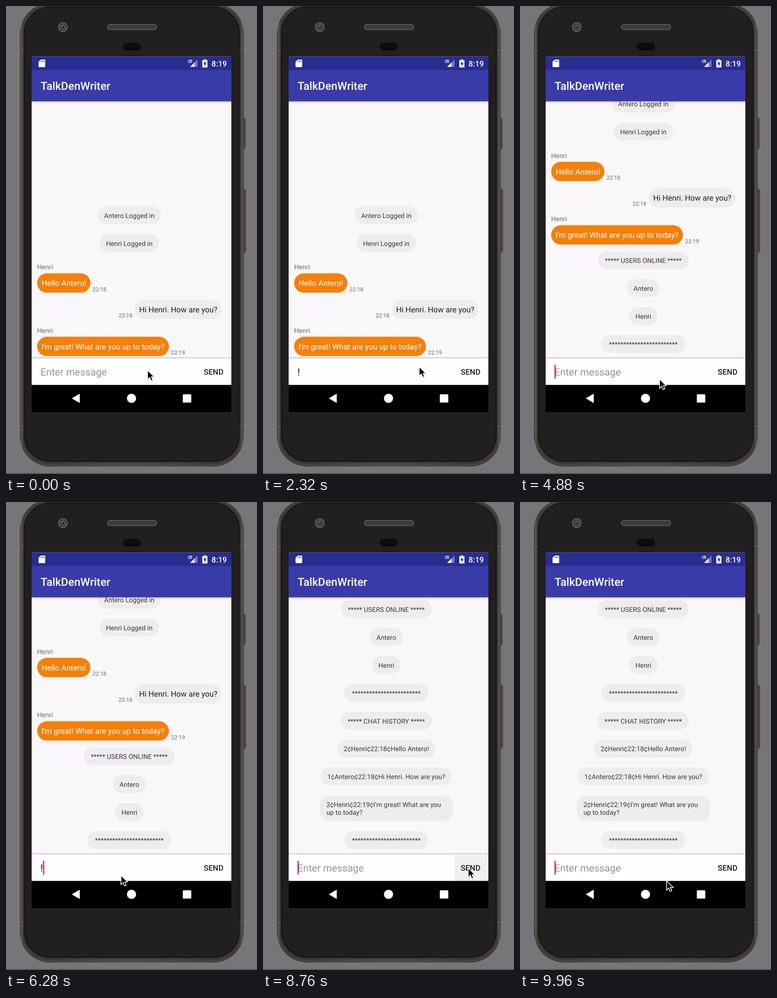
An HTML page that plays this animation: 548x1022 px, repeating every 10000 ms.

```html
<!DOCTYPE html>
<html lang="en">
<head>
<meta charset="utf-8">
<title>Chat client</title>
<style>
  html, body { margin: 0; width: 100%; height: 100%; overflow: hidden; background: #777577; }
  svg { display: block; width: 100vw; height: 100vh; }
  text { font-family: Roboto, sans-serif; white-space: pre; text-rendering: geometricPrecision; }
  .medium { font-weight: 500; }
  .field { font-size: 21.8px; }
</style>
</head>
<body>
<svg viewBox="0 0 548 1022">
  <defs>
    <clipPath id="listClip"><rect x="56" y="208" width="436" height="560"/></clipPath>
    <clipPath id="fieldClip"><rect x="56" y="770" width="436" height="57.5"/></clipPath>
    <linearGradient id="rim">
      <stop offset="0" stop-color="#353230"/>
      <stop offset=".007" stop-color="#5b5754"/>
      <stop offset=".014" stop-color="#3a3735"/>
      <stop offset=".5" stop-color="#4a4643"/>
      <stop offset=".986" stop-color="#3a3735"/>
      <stop offset=".993" stop-color="#5b5754"/>
      <stop offset="1" stop-color="#353230"/>
    </linearGradient>
    <linearGradient id="drop" x2="0" y2="1">
      <stop offset="0" stop-color="#000" stop-opacity=".25"/>
      <stop offset="1" stop-color="#000" stop-opacity="0"/>
    </linearGradient>
  </defs>

  <!-- Phone -->
  <rect width="548" height="1022" fill="#777577"/>
  <rect y="1020" width="548" height="2" fill="#555355"/>
  <g fill="#4a4745" stroke="#353230" stroke-width=".8">
    <rect x="517" y="245" width="5.5" height="67" rx="2"/>
    <rect x="517" y="400" width="6.5" height="138" rx="2"/>
  </g>
  <rect x="30.5" y="-6" width="488.5" height="1011.5" rx="66" fill="url(#rim)"/>
  <rect x="33.5" y="-3" width="482.5" height="1005.5" rx="63" fill="none" stroke="#5b5754"/>
  <rect x="39" y="1" width="471.5" height="995" rx="58" fill="#191718"/>
  <rect x="42" y="4" width="465.5" height="989" rx="55" fill="#221f20"/>
  <path d="M31 97h8M510 97h8M31 918h8M510 918h8" stroke="#6c6865" stroke-width="1.5"/>

  <circle cx="124" cy="46" r="10.5" fill="#6a6768"/>
  <circle cx="124" cy="46" r="8.5" fill="#343134"/>
  <circle cx="124" cy="46" r="6" fill="#5d5a5e"/>
  <circle cx="124" cy="46" r="3.5" fill="#29262a"/>
  <circle cx="123" cy="44.5" r="1.2" fill="#8e8a90"/>
  <rect x="221.5" y="40.5" width="107.5" height="11" rx="5" fill="#3c393a" stroke="#6a6664" stroke-width="1.3"/>
  <rect x="255" y="80" width="39.5" height="17" rx="8.5" fill="#0d0b0c"/>

  <!-- Screen -->
  <rect x="56" y="110.5" width="436" height="776.5" fill="#f9f7fa"/>
  <g id="list" clip-path="url(#listClip)"><g id="items"></g></g>
  <rect x="56" y="207.5" width="436" height="5" fill="url(#drop)"/>
  <rect x="56" y="139" width="436" height="69" fill="#393ba9"/>
  <rect x="56" y="110.5" width="436" height="29" fill="#292c90"/>
  <text class="medium" x="75.5" y="182.8" font-size="24.2" fill="#fff">TalkDenWriter</text>

  <!-- Status icons -->
  <path d="M76 117h8q1.5 0 1.5 1.5v13.500q0 1.500-1.500 1.500h-11.500q-1.500 0-1.500-1.500v-10z" fill="#fff"/>
  <path d="M76.800 119v3.500M79.700 119v3.500M82.600 119v3.500" stroke="#292c90" stroke-width="1.300"/>
  <text class="medium" x="397" y="124" font-size="9" letter-spacing="-1.2" fill="#fff" style="font-family:'Roboto Condensed',Roboto,sans-serif">LTE</text>
  <path d="M418 117v16h-16z" fill="#fff" opacity=".38"/>
  <path d="M411.500 123.500v9.500h-9.500z" fill="#fff"/>
  <path d="M432 116.500h4.500v1.700h3.300v16h-11.200v-16h3.400z" fill="#fff"/>
  <path d="M435.300 119.800l-4.300 7.200h2.600v5l4.300-7.200h-2.600z" fill="#292c90"/>
  <text class="medium" x="448.800" y="131.500" font-size="16.950" fill="#fff">8:19</text>

  <!-- Message field -->
  <rect x="56" y="767" width="436" height="3" fill="#d3d1d4"/>
  <rect x="56" y="769.500" width="436" height="58.500" fill="#fefefe"/>
  <rect id="ripple" x="418" y="771" width="74" height="56" fill="#000"/>
  <g clip-path="url(#fieldClip)">
    <text id="hint" class="field" x="75.300" y="807" fill="#979598">Enter message</text>
    <text id="typed" class="field" x="75.300" y="807" fill="#1c1b1d"></text>
    <rect id="caret" width="2.400" height="30" fill="#cb1463"/>
  </g>
  <text class="medium" x="431.800" y="805" font-size="16.950" fill="#1c1b1d">SEND</text>

  <!-- Navigation -->
  <rect x="56" y="827.500" width="436" height="59.500" fill="#000"/>
  <g fill="#fff">
    <path d="M144.500 856.800L160.500 847.300V866.300Z" stroke="#fff" stroke-linejoin="round"/>
    <circle cx="274" cy="856.800" r="10"/>
    <rect x="386" y="848" width="18.500" height="18" rx="1.500"/>
  </g>

  <g id="mouse">
    <path d="M0 0V17L4 13.200 6.500 19.200 9.700 17.900 7.200 12H12.400Z" transform="translate(1 2.500) scale(1.200)" fill="#000" opacity=".18"/>
    <path d="M0 0V17L4 13.200 6.500 19.200 9.700 17.900 7.200 12H12.400Z" transform="scale(1.180)" fill="#000" stroke="#fff" stroke-width="1.300"/>
  </g>
</svg>

<script>
const LOOP = 10000, PITCH = 60.87, BLINK = 250;
const ORANGE = '#f4800a', GRAY = '#eeecee', DARK = '#1f1e20';
const $ = id => document.getElementById(id);

function add(parent, tag, attrs, content = '') {
  const el = document.createElementNS('http://www.w3.org/2000/svg', tag);
  for (const key in attrs) el.setAttribute(key, attrs[key]);
  el.textContent = content;
  return parent.appendChild(el);
}
const group = () => add($('items'), 'g', {});
const label = (g, x, y, size, fill, str, anchor = 'start') =>
  add(g, 'text', { x, y, 'font-size': size, fill, 'text-anchor': anchor }, str);

// Centred notice; a second line makes the bubble taller.
function notice(g, top, width, ...lines) {
  const x = 269.2 - width / 2;
  const tall = lines.length > 1;
  add(g, 'rect', { x, y: top, width, height: 39 + 17 * (lines.length - 1), rx: 19.5, fill: GRAY });
  lines.forEach((str, i) =>
    label(g, tall ? x + 14.5 : 269.2, top + 25.5 + 17 * i, 14.53, '#3b393c', str, tall ? 'start' : 'middle'));
}

function message(g, top, x, width, timeX, time, str, sender) {
  add(g, 'rect', { x, y: top, width, height: 42.3, rx: 21.1, fill: sender ? ORANGE : GRAY });
  label(g, x + 9.7, top + 27.6, 16.95, sender ? '#fff' : DARK, str);
  label(g, timeX, top + 38.7, 12.1, '#6b696c', time);
  if (sender) label(g, 68, top - 8.8, 14.53, '#6b696c', sender);
}

const STARS = '*'.repeat(24);
const chat = group(), users = group(), history = group();
notice(chat, 437.2, 138.5, 'Antero Logged in');
notice(chat, 498, 130, 'Henri Logged in');
message(chat, 583.8, 68, 116.3, 189, '22:18', 'Hello Antero!', 'Henri');
message(chat, 641.2, 281, 189.5, 245.7, '22:18', 'Hi Henri. How are you?');
message(chat, 722.3, 68, 287.8, 360.6, '22:19', "I'm great! What are you up to today?", 'Henri');

const usersTop = 779.4, historyTop = usersTop + 4 * PITCH;
notice(users, usersTop, 198.5, '***** USERS ONLINE *****');
notice(users, usersTop + PITCH, 72, 'Antero');
notice(users, usersTop + 2 * PITCH, 62.5, 'Henri');
notice(users, usersTop + 3 * PITCH, 184, STARS);

notice(history, historyTop, 200, '***** CHAT HISTORY *****');
notice(history, historyTop + PITCH, 215, '2¢Henri¢22:18¢Hello Antero!');
notice(history, historyTop + 2 * PITCH, 287, '1¢Antero¢22:18¢Hi Henri. How are you?');
notice(history, historyTop + 3 * PITCH, 290.5, "2¢Henri¢22:19¢I'm great! What are you", 'up to today?');
notice(history, historyTop + 4 * PITCH + 17, 184, STARS);

// Field contents over time; null means the field has no focus.
const typing = (start, step, base, str) =>
  [...str].map((_, i) => [start + step * i, base + str.slice(0, i + 1)]);
const edits = [
  [0, null], [700, ''], [1300, '!'], [1880, ''], [2060, '!'], [2680, '!u'],
  ...typing(3000, 120, '!u', 'sers'),
  [3470, '!users\n'], [3800, '!users'], [4640, ''],
  ...typing(6220, 110, '', '!messages'),
  [7790, '!messages\n'], [8200, '!messages'], [8720, '']
];
const sends = [4640, 8720];

const path = [
  [0, 309, 795.5], [40, 309, 795.5], [1040, 341, 788], [3960, 341, 788],
  [4000, 402, 795], [4160, 448, 800], [4700, 448, 800], [4880, 304.7, 815],
  [5000, 303, 818], [5920, 251, 815.5], [8040, 251, 815.5], [8500, 448, 799.5],
  [9080, 448, 799.5], [9960, 320, 827.5], [LOOP, 320, 827.5]
];

function mouseAt(t) {
  const i = path.findIndex(p => p[0] > t);
  const [t0, x0, y0] = path[i - 1], [t1, x1, y1] = path[i];
  const k = (t - t0) / (t1 - t0), e = k * k * (3 - 2 * k);
  return [x0 + (x1 - x0) * e, y0 + (y1 - y0) * e];
}

function drawField(t) {
  const [since, value] = edits.filter(e => e[0] <= t).pop();
  const [line, second] = (value || '').split('\n');
  const twoLines = second !== undefined;
  const typed = $('typed'), caret = $('caret');
  typed.textContent = line;
  typed.setAttribute('y', twoLines ? 794.3 : 807);
  $('hint').style.display = value ? 'none' : '';
  const lineWidth = line && !twoLines ? typed.getComputedTextLength() : 0;
  caret.setAttribute('x', 75.4 + lineWidth);
  caret.setAttribute('y', twoLines ? 799 : 783.5);
  const on = value !== null && (t - since) % (2 * BLINK) < BLINK;
  caret.style.display = on ? '' : 'none';
}

function rippleAt(t) {
  const age = t - sends.filter(s => s - 80 <= t).pop();
  if (!(age < 200)) return 0;
  return age < 0 ? .07 * (1 + age / 80) : .07 * (1 - age / 200);
}

function render(t) {
  const showUsers = t >= 4660, showHistory = t >= 8740;
  users.style.display = showUsers ? '' : 'none';
  history.style.display = showHistory ? '' : 'none';
  const scroll = (showUsers ? 4 * PITCH : 0) + (showHistory ? 5 * PITCH + 17 : 0);
  $('items').setAttribute('transform', `translate(0 ${-scroll})`);
  drawField(t);
  $('ripple').setAttribute('opacity', rippleAt(t));
  $('mouse').setAttribute('transform', `translate(${mouseAt(t)})`);
}

const start = performance.now();
function tick() {
  render((performance.now() - start) % LOOP);
  requestAnimationFrame(tick);
}
render(0);
requestAnimationFrame(tick);
</script>
</body>
</html>
```
